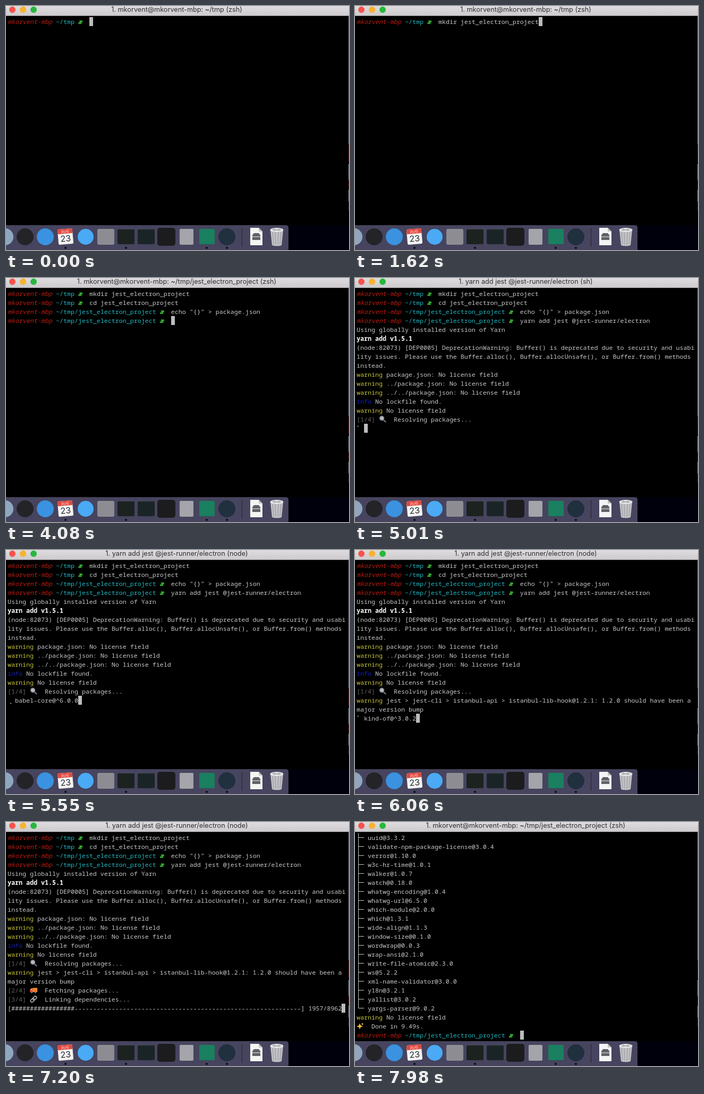
Recreate the animation shown at these times as an HTML page. Size 646 by 462 pixels, loop 8 s.

```html
<!DOCTYPE html>
<html lang="en">
<head>
<meta charset="utf-8">
<title>Terminal session</title>
<style>
html, body { margin: 0; width: 100%; height: 100%; overflow: hidden; background: #000; }
#stage { position: relative; width: 646px; height: 462px; overflow: hidden; background: #000; }
#bar { position: absolute; left: 0; top: 0; width: 646px; height: 18px;
  background: linear-gradient(#dedcde, #cdcbcd); border-bottom: 1px solid #8c8a8c; }
#bar b { position: absolute; top: 1px; width: 12px; height: 12px; border-radius: 50%; }
#title { position: absolute; left: 0; width: 643px; top: 0; text-align: center; white-space: pre;
  font: 12.7px/14px Inter, sans-serif; color: #303030; }
#edge { position: absolute; left: 645px; top: 19px; width: 1px; height: 368px;
  background: linear-gradient(#808088 243px, #5a1c1c 243px 276px, #000 276px 280px, #94949c 280px 310px,
    #5a1c1c 310px 329px, #94949c 329px 351px, #333 351px); }
#screen { position: absolute; left: 3px; top: 21px; margin: 0; color: #c8c8ca;
  font: 11.667px/17px "Noto Sans Mono", "DejaVu Sans Mono", monospace; font-variant-ligatures: none; }
#screen svg { width: 14px; height: 17px; vertical-align: top; }
.host { color: #bc1c10; font-style: italic; }
.path { color: #22b8c0; }
.sign { color: #42d83c; font-weight: bold; font-style: italic; }
.warn { color: #c6c43a; }
.info { color: #1820b8; }
.dim { color: #626264; }
.bold { color: #fff; font-weight: bold; }
.spin { display: inline-block; width: 7px; height: 17px; vertical-align: top; overflow: hidden; }
.cursor { display: inline-block; width: 7px; height: 17px; vertical-align: top; background: #bcbcbe; }
#dock { position: absolute; left: 0; top: 0; }
</style>
</head>
<body>
<div id="stage">
  <div id="bar">
    <b style="left:6px;background:#f8524c"></b>
    <b style="left:26px;background:#f8b22c"></b>
    <b style="left:46px;background:#26b93a"></b>
    <div id="title"></div>
  </div>
  <div id="edge"></div>
  <pre id="screen"></pre>
  <svg id="dock" width="646" height="462">
    <path d="M532 415H646V462H532Z" fill="#00000c"/>
    <path d="M0 415H527Q532 415 532 420V462H0Z" fill="#46445e"/>
    <circle cx="-2" cy="437" r="16" fill="#8fa8c0"/>
    <circle cx="36" cy="437" r="16" fill="#242428"/>
    <circle cx="74" cy="437" r="16" fill="#3a92e0"/>
    <g transform="rotate(-5 112 437)" text-anchor="middle" font-family="Inter, sans-serif">
      <rect x="98" y="422" width="28" height="29" rx="2" fill="#f4f4f4"/>
      <path d="M98 431V424q0-2 2-2h24q2 0 2 2v7Z" fill="#e04a40"/>
      <text x="112" y="429.5" font-size="7" fill="#fbe8e6">AUG</text>
      <text x="112" y="446" font-size="16" fill="#2b2b2e">23</text>
    </g>
    <circle cx="150" cy="437" r="15" fill="#4aaaf6"/>
    <rect x="172" y="422" width="32" height="30" rx="3" fill="#8c8c92"/>
    <rect x="210" y="423" width="32" height="28" rx="2" fill="#1c2220"/>
    <rect x="248" y="423" width="32" height="28" rx="2" fill="#1a2426"/>
    <rect x="285" y="420" width="34" height="34" rx="5" fill="#1c1c1e"/>
    <rect x="327" y="422" width="26" height="30" rx="2" fill="#a4a4aa"/>
    <rect x="364" y="422" width="29" height="29" rx="2" fill="#1a8060"/>
    <circle cx="416" cy="437" r="16" fill="#20303e"/>
    <path d="M444.5 421V456" stroke="#24242e"/>
    <path d="M460 420H476L483 427V453H460Z" fill="#f4f4f4"/>
    <path d="M476 420V427H483" fill="#c4c4c8"/>
    <path d="M464 434l3-4h9l3 4v9H464Z" fill="#606066"/>
    <path d="M464 437H479" stroke="#a8a8ae" stroke-width="2"/>
    <path d="M498 424H522L519 453Q510 456 501 453Z" fill="#c2c2c6"/>
    <path d="M502 428l2 23M507 428l1 24M513 428l-1 24M518 428l-2 23" stroke="#94949a" fill="none"/>
    <ellipse cx="510" cy="424" rx="12.5" ry="4" fill="#e8e8ea"/>
    <path d="M501 424l4-3 5 2 4-2 5 3-5 2-5-1-4 1Z" fill="#b4b4b8"/>
    <g fill="#0a0a10">
      <circle cx="112" cy="458" r="2"/><circle cx="226" cy="458" r="2"/>
      <circle cx="378" cy="458" r="2"/><circle cx="416" cy="458" r="2"/>
    </g>
  </svg>
</div>
<script>
const LOOP = 8000, TICK = 30;
const USER = 'mkorvent', HOST = USER + '-mbp';
const HOME = '~/tmp', PROJECT = HOME + '/jest_electron_project';
const titleEl = document.getElementById('title');
const screenEl = document.getElementById('screen');

const span = (cls, text) => `<span class="${cls}">${text}</span>`;
const svg = body => `<svg viewBox="0 0 14 17">${body}</svg>`;
const warn = text => span('warn', 'warning') + ' ' + text;
const prompt = path => `${span('host', HOST)} ${span('path', path)} ${span('sign', 'æ')}  `;
const step = (n, icon, text) => `${span('dim', `[${n}/4]`)} ${svg(icon)}  ${text}...`;
const branch = d => svg(`<path d="${d}" stroke="#c8c8ca" fill="none"/>`);
const tee = branch('M3.5 0V17M3.5 8.5H14');
const elbow = branch('M3.5 0V8.5H14');

const icons = {
  search: '<path d="M8 9l5 5" stroke="#77777c" stroke-width="2.4"/><circle cx="5.5" cy="6.5" r="4" fill="#b4bec4" stroke="#77777c" stroke-width="1.4"/>',
  truck: '<path d="M5 4h9v8H5Z" fill="#e8822e"/><path d="M0 12V8l2-3h3v7Z" fill="#e0502c"/><path d="M1.5 8l1-2H4v2Z" fill="#cde0e6"/><circle cx="3.5" cy="12.5" r="1.7" fill="#777"/><circle cx="10.5" cy="12.5" r="1.7" fill="#777"/>',
  link: '<g transform="rotate(-45 7 8.5)" fill="none" stroke="#b0b0b6" stroke-width="1.6"><rect x="0" y="6" width="8" height="5" rx="2.5"/><rect x="6" y="6" width="8" height="5" rx="2.5"/></g>',
  page: '<path d="M2 2h10v13H2Z" fill="#e0e0e2"/><path d="M4 5h6M4 8h6M4 11h6" stroke="#85858a"/>',
  sparkles: '<path d="M6 3l1.5 4L12 9l-4.5 1.5L6 15 4.5 10.5 0 9l4.5-2ZM11 2l.7 1.8 1.8.7-1.8.7L11 7l-.7-1.8-1.8-.7 1.8-.7Z" fill="#f4bd38"/>'
};

// Each command is typed between start and end, then entered.
const commands = [
  { path: HOME, text: 'mkdir jest_electron_project', start: 360, end: 1560, enter: 1740 },
  { path: HOME, text: 'cd jest_electron_project', start: 1860, end: 2700, enter: 2820 },
  { path: PROJECT, text: 'echo "{}" > package.json', start: 2940, end: 3840, enter: 3990 },
  { path: PROJECT, text: 'yarn add jest @jest-runner/electron', start: 4110, end: 4830, enter: 4890 }
];

// Lines printed by the install, with the time each one appears.
const output = [
  [4890, 'Using globally installed version of Yarn'],
  [4920, span('bold', 'yarn add v1.5.1')],
  [4950, '(node:82073) [DEP0005] DeprecationWarning: Buffer() is deprecated due to security and usabi'],
  [4950, 'lity issues. Please use the Buffer.alloc(), Buffer.allocUnsafe(), or Buffer.from() methods'],
  [4950, 'instead.'],
  [4980, warn('package.json: No license field')],
  [4980, warn('../package.json: No license field')],
  [4980, warn('../../package.json: No license field')],
  [4980, span('info', 'info') + ' No lockfile found.'],
  [4980, warn('No license field')],
  [4980, step(1, icons.search, 'Resolving packages')],
  [5880, warn('jest > jest-cli > istanbul-api > istanbul-lib-hook@1.2.1: 1.2.0 should have been a')],
  [5880, 'major version bump'],
  [6540, step(2, icons.truck, 'Fetching packages')],
  [6840, step(3, icons.link, 'Linking dependencies')],
  [7620, step(4, icons.page, 'Building fresh packages')]
];

const resolving = `jest@* electron@^1.8.4 jest-cli@^22.4.2 jest-runner@^22.4.2 chalk@^2.0.1
 micromatch@^2.3.11 yargs@^10.0.3 jsdom@^11.5.1 babel-core@^6.0.0 graceful-fs@^4.1.11
 node-notifier@^5.2.1 source-map@^0.5.6 cssom@0.3.x braces@^1.8.2 request@^2.83.0
 string-width@^2.0.0 number-is-nan@^1.0.0 kind-of@^3.0.2 is-buffer@^1.1.5
 repeat-string@^1.5.2 isarray@1.0.0 once@^1.3.0 wrappy@1 inherits@2`.split(/\s+/);

const installed = `uuid@3.3.2 validate-npm-package-license@3.0.4 verror@1.10.0 w3c-hr-time@1.0.1
 walker@1.0.7 watch@0.18.0 whatwg-encoding@1.0.4 whatwg-url@6.5.0 which-module@2.0.0 which@1.3.1
 wide-align@1.1.3 window-size@0.1.0 wordwrap@0.0.3 wrap-ansi@2.1.0 write-file-atomic@2.3.0 ws@5.2.2
 xml-name-validator@3.0.0 y18n@3.2.1 yallist@3.0.2 yargs-parser@9.0.2`.split(/\s+/);

const finalScreen = [
  ...installed.map((name, i) => (i < installed.length - 1 ? tee : elbow) + ' ' + name),
  warn('No license field'),
  svg(icons.sparkles) + '  Done in 9.49s.',
  prompt(PROJECT)
];

const clamp = x => Math.min(1, Math.max(0, x));

function track(t, points) {
  let value = points[0][1];
  for (let i = 1; i < points.length; i++) {
    const [t0, a] = points[i - 1], [t1, b] = points[i];
    if (t >= t0) value = a + (b - a) * clamp((t - t0) / (t1 - t0));
  }
  return Math.floor(value);
}

function progress(done, total) {
  const width = 78, filled = Math.floor(width * done / total);
  return `[${'#'.repeat(filled)}${'-'.repeat(width - filled)}] ${done}/${total}`;
}

function spinner(t, text) {
  return span('spin', '⠁⠂⠄⡀⢀⠠⠐⠈'[Math.floor((t - 4980) / 130) % 8]) + ' ' + text;
}

function statusLine(t) {
  if (t < 4980) return '';
  if (t < 6540) {
    const i = Math.floor((t - 5040) / 60);
    return spinner(t, i < 0 ? '' : resolving[Math.min(i, resolving.length - 1)]);
  }
  if (t < 6840) return progress(track(t, [[6540, 0], [6810, 573]]), 573);
  if (t < 7620) return progress(track(t, [[6870, 0], [7200, 1957], [7590, 8962]]), 8962);
  return spinner(t, '');
}

function lines(t) {
  if (t >= 7800) return finalScreen;
  const rows = [];
  for (const { path, text, start, end, enter } of commands) {
    const typed = Math.floor(text.length * clamp((t - start) / (end - start)));
    rows.push(prompt(path) + text.slice(0, typed));
    if (t < enter) return rows;
  }
  for (const [time, text] of output) if (t >= time) rows.push(text);
  rows.push(statusLine(t));
  return rows;
}

function windowTitle(t) {
  if (t >= 4890 && t < 7800) return `1. yarn add jest @jest-runner/electron (${t < 5100 ? 'sh' : 'node'})`;
  return `1. ${USER}@${HOST}: ${t < 2820 ? HOME : PROJECT} (zsh)`;
}

let shown = '';
function draw() {
  const t = Math.floor(performance.now() % LOOP / TICK) * TICK;
  const html = lines(t).join('\n') + span('cursor', '');
  if (html !== shown) screenEl.innerHTML = shown = html;
  titleEl.textContent = windowTitle(t);
  requestAnimationFrame(draw);
}
draw();
</script>
</body>
</html>
```
